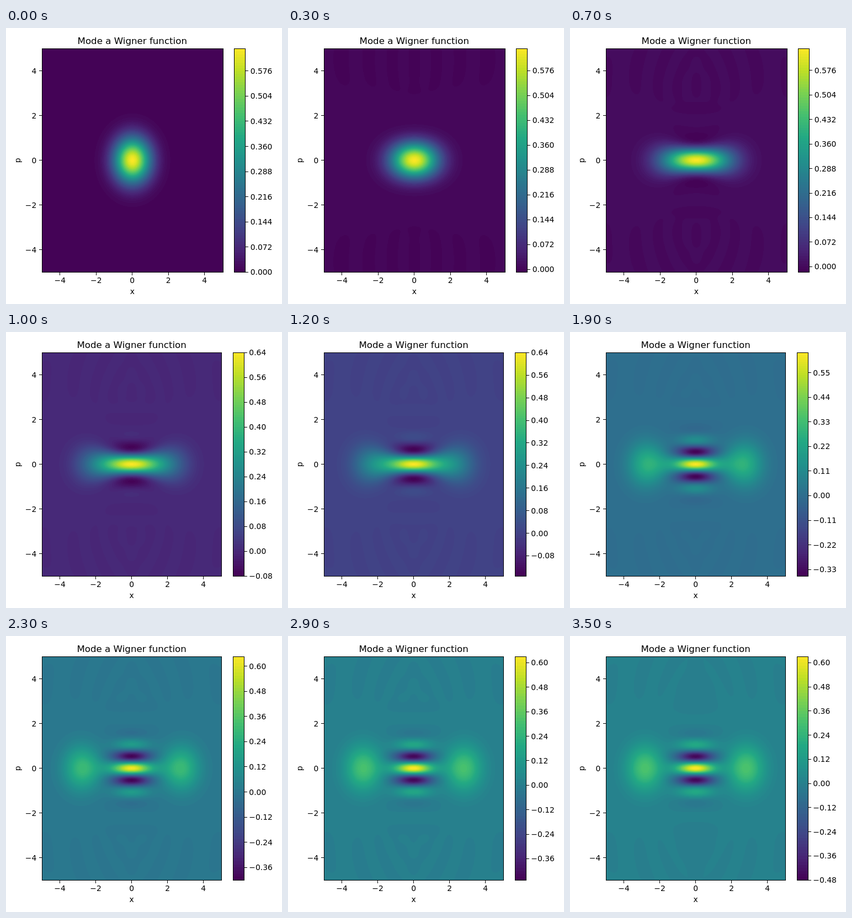
Write an HTML page with a canvas that moves like this. It is 500 px wide and 500 px high and loops after 4000 ms.

```html
<!DOCTYPE html>
<html lang="en">
<head>
<meta charset="utf-8">
<title>Mode a Wigner function</title>
<style>
html, body { margin: 0; height: 100%; overflow: hidden; background: #fff; }
canvas { display: block; }
</style>
</head>
<body>
<canvas id="stage" width="500" height="500"></canvas>
<script>
const ctx = document.getElementById('stage').getContext('2d');

// ---- Cat state growing from vacuum: one mode, jump operator L = a^2 - 4 ----
// Only even photon numbers 0, 2 ... 18 take part.
const M = 10, MM = M * M, STEP = 0.002;
const L = new Float64Array(MM), G = new Float64Array(MM);
for (let i = 0; i < M; i++) {
  L[i * M + i] = -4;
  if (i + 1 < M) L[i * M + i + 1] = Math.sqrt((2 * i + 2) * (2 * i + 1));
}
for (let i = 0; i < M; i++)
  for (let j = 0; j < M; j++)
    for (let k = 0; k < M; k++) G[i * M + j] += L[k * M + i] * L[k * M + j];

function mul(a, b, flip) {
  const out = new Float64Array(MM);
  for (let i = 0; i < M; i++)
    for (let j = 0; j < M; j++) {
      let s = 0;
      for (let k = 0; k < M; k++) s += a[i * M + k] * (flip ? b[j * M + k] : b[k * M + j]);
      out[i * M + j] = s;
    }
  return out;
}

function rate(rho) {
  const out = mul(mul(L, rho), L, true), g = mul(G, rho);
  for (let i = 0; i < M; i++)
    for (let j = 0; j < M; j++) out[i * M + j] -= (g[i * M + j] + g[j * M + i]) / 2;
  return out;
}

const add = (a, b, f) => a.map((v, i) => v + f * b[i]);

function advance(rho) {
  const a = rate(rho);
  const b = rate(add(rho, a, STEP / 2));
  const c = rate(add(rho, b, STEP / 2));
  const d = rate(add(rho, c, STEP));
  return rho.map((v, i) => v + STEP / 6 * (a[i] + 2 * b[i] + 2 * c[i] + d[i]));
}

// ---- Wigner basis on one quadrant of a 200 x 200 grid ----
const Q = 100, H = 10 / 199;

function laguerre(n, d, x) {
  let prev = 0, cur = 1;
  for (let k = 0; k < n; k++)
    [prev, cur] = [cur, ((2 * k + 1 + d - x) * cur - (k + d) * prev) / (k + 1)];
  return cur;
}

const basis = [];
for (let i = 0; i < M; i++)
  for (let j = i; j < M; j++) {
    const m = 2 * i, d = 2 * (j - i), values = new Float64Array(Q * Q);
    let scale = (d ? 4 : 2) / Math.PI;
    for (let k = m + 1; k <= m + d; k++) scale /= Math.sqrt(k);
    for (let ix = 0; ix < Q; ix++)
      for (let ip = 0; ip < Q; ip++) {
        const x = (ix + 0.5) * H, p = (ip + 0.5) * H, rr = x * x + p * p;
        values[ix * Q + ip] = scale * Math.pow(2 * rr, d / 2) * Math.exp(-rr) *
          Math.cos(d * Math.atan2(p, x)) * laguerre(m, d, 2 * rr);
      }
    basis.push({ at: i * M + j, values });
  }

function wigner(rho, count) {
  const out = new Float64Array(count);
  for (const { at, values } of basis) {
    const c = rho[at];
    if (c) for (let i = 0; i < count; i++) out[i] += c * values[i];
  }
  return out;
}

// ---- History of states, paced by the depth of the dark fringe ----
const vacuum = new Float64Array(MM);
vacuum[0] = 1;
const states = [vacuum], depths = [0];
while (depths[depths.length - 1] < 0.472 && states.length < 2000) {
  const rho = advance(states[states.length - 1]);
  states.push(rho);
  depths.push(-Math.min(...wigner(rho, Q)));
}

function whenDeep(d) {
  const i = depths.findIndex(v => v >= d);
  return i < 1 ? depths.length - 1 : i - (depths[i] - d) / (depths[i] - depths[i - 1]);
}

const pace = [[1, 0], [10, 0.076], [15, 0.255], [19, 0.356], [21, 0.393],
  [24, 0.4225], [29, 0.4515], [35, 0.4655]].map(([k, d]) => [k, d && whenDeep(d)]);

function stateAt(k) {
  if (k <= 1) return vacuum;
  let i = 1;
  while (i < pace.length - 1 && pace[i][0] < k) i++;
  const [k0, s0] = pace[i - 1], [k1, s1] = pace[i];
  const s = Math.min(s0 + (s1 - s0) * (k - k0) / (k1 - k0), states.length - 1.001);
  const n = Math.floor(s), f = s - n;
  return states[n].map((v, j) => v * (1 - f) + states[n + 1][j] * f);
}

// ---- Drawing ----
const LEFT = 65, TOP = 37.4, BOTTOM = 442.2, TALL = BOTTOM - TOP;
const BAR = 20, TICK = 5, GAP = 9.72;
const stops = ['440154', '482475', '414487', '355f8d', '2a788e', '21918c',
  '22a884', '44bf70', '7ad151', 'bddf26', 'fde725']
  .map(h => [0, 2, 4].map(i => parseInt(h.substr(i, 2), 16)));

function viridis(v) {
  const i = Math.min(Math.floor(v * 10), 9), f = v * 10 - i;
  return stops[i].map((c, n) => Math.round(c + (stops[i + 1][n] - c) * f));
}

function contourLevels(min, max) {
  const raw = (max - min) / 101, ten = 10 ** Math.floor(Math.log10(raw));
  const step = ten * [1, 1.5, 2, 2.5, 3, 4, 5, 6, 8, 10].find(s => s * ten >= raw);
  return { step, lo: Math.floor(min / step), hi: Math.ceil(max / step) };
}

function barTicks({ step, lo, hi }) {
  const every = Math.ceil((hi - lo + 1) / 10), gap = every * step, ticks = [];
  let digits = 0;
  while (Math.abs(gap * 10 ** digits - Math.round(gap * 10 ** digits)) > 1e-6) digits++;
  for (let j = Math.ceil(lo / every) * every; j <= hi; j += every)
    ticks.push({ at: (j - lo) / (hi - lo), label: (j * step).toFixed(digits).replace('-', '\u2212') });
  return ticks;
}

function text(s, x, y, align, size = 13.89) {
  ctx.font = size + 'px "DejaVu Sans", sans-serif';
  ctx.textAlign = align;
  ctx.fillText(s, x, y);
}

function box(x0, x1) {
  const y0 = Math.floor(TOP), y1 = Math.floor(BOTTOM);
  ctx.strokeRect(x0 + 0.5, y0 + 0.5, x1 - x0, y1 - y0);
}

function fillPlot(field, levels, colors, right) {
  const top = Math.floor(TOP), w = right - LEFT, h = Math.floor(BOTTOM) - top;
  const img = ctx.createImageData(w, h);
  const cell = (v, size) => {
    const u = Math.min(Math.max(Math.abs((v + 0.5) / size * 10 - 5) / H - 0.5, 0), Q - 1.001);
    return [Math.floor(u), u % 1];
  };
  const rows = Array.from({ length: h }, (_, y) => cell(y, h));
  for (let x = 0; x < w; x++) {
    const [i, f] = cell(x, w);
    for (let y = 0; y < h; y++) {
      const [j, g] = rows[y], a = i * Q + j, b = a + Q;
      const v = (field[a] * (1 - g) + field[a + 1] * g) * (1 - f) +
        (field[b] * (1 - g) + field[b + 1] * g) * f;
      const c = colors[Math.min(Math.max(Math.floor(v / levels.step) - levels.lo, 0), colors.length - 1)];
      const o = (y * w + x) * 4;
      img.data[o] = c[0];
      img.data[o + 1] = c[1];
      img.data[o + 2] = c[2];
      img.data[o + 3] = 255;
    }
  }
  ctx.putImageData(img, LEFT, top);
}

function draw(k) {
  const field = wigner(stateAt(k), Q * Q);
  let min = Infinity, max = -Infinity;
  for (const v of field) {
    min = Math.min(min, v);
    max = Math.max(max, v);
  }
  const levels = contourLevels(min, max), bands = levels.hi - levels.lo;
  const colors = Array.from({ length: bands }, (_, i) => viridis((i + 0.5) / bands));
  const ticks = barTicks(levels);

  ctx.fillStyle = '#fff';
  ctx.fillRect(0, 0, 500, 500);
  ctx.font = '13.89px "DejaVu Sans", sans-serif';
  const labelWidth = Math.max(...ticks.map(t => ctx.measureText(t.label).width));
  const room = 514.1 - labelWidth - LEFT, wide = room * 0.8;
  const right = Math.round(LEFT + wide), bar = Math.round(LEFT + room * 0.85);

  fillPlot(field, levels, colors, right);
  for (let y = Math.floor(TOP); y < BOTTOM; y++) {
    const i = Math.floor((BOTTOM - y - 0.5) / TALL * bands);
    ctx.fillStyle = `rgb(${colors[Math.min(Math.max(i, 0), bands - 1)]})`;
    ctx.fillRect(bar, y, BAR, 1);
  }

  ctx.fillStyle = ctx.strokeStyle = '#000';
  ctx.lineWidth = 1;
  box(LEFT, right);
  box(bar, bar + BAR);
  for (const t of ticks) {
    const y = BOTTOM - t.at * TALL;
    ctx.fillRect(bar + BAR + 1, Math.floor(y), TICK, 1);
    text(t.label, LEFT + room * 0.85 + BAR + GAP, y + 5, 'left');
  }
  for (let n = -4; n <= 4; n += 2) {
    const label = String(n).replace('-', '\u2212');
    const x = LEFT + wide * (n + 5) / 10, y = BOTTOM - TALL * (n + 5) / 10;
    ctx.fillRect(Math.floor(x), Math.floor(BOTTOM) + 1, 1, TICK);
    ctx.fillRect(LEFT - TICK, Math.floor(y), TICK, 1);
    text(label, x, 462, 'center');
    text(label, LEFT - GAP, y + 5, 'right');
  }
  const mid = LEFT + wide / 2;
  text('Mode a Wigner function', mid, 29, 'center', 16.67);
  text('x', mid, 482, 'center');
  ctx.save();
  ctx.translate(26, (TOP + BOTTOM) / 2);
  ctx.rotate(-Math.PI / 2);
  text('p', 0, 0, 'center');
  ctx.restore();
}

let shown = -1;
function tick() {
  const k = Math.floor(performance.now() % 4000 / 100);
  if (k !== shown) draw(shown = k);
  requestAnimationFrame(tick);
}
tick();
</script>
</body>
</html>
```
